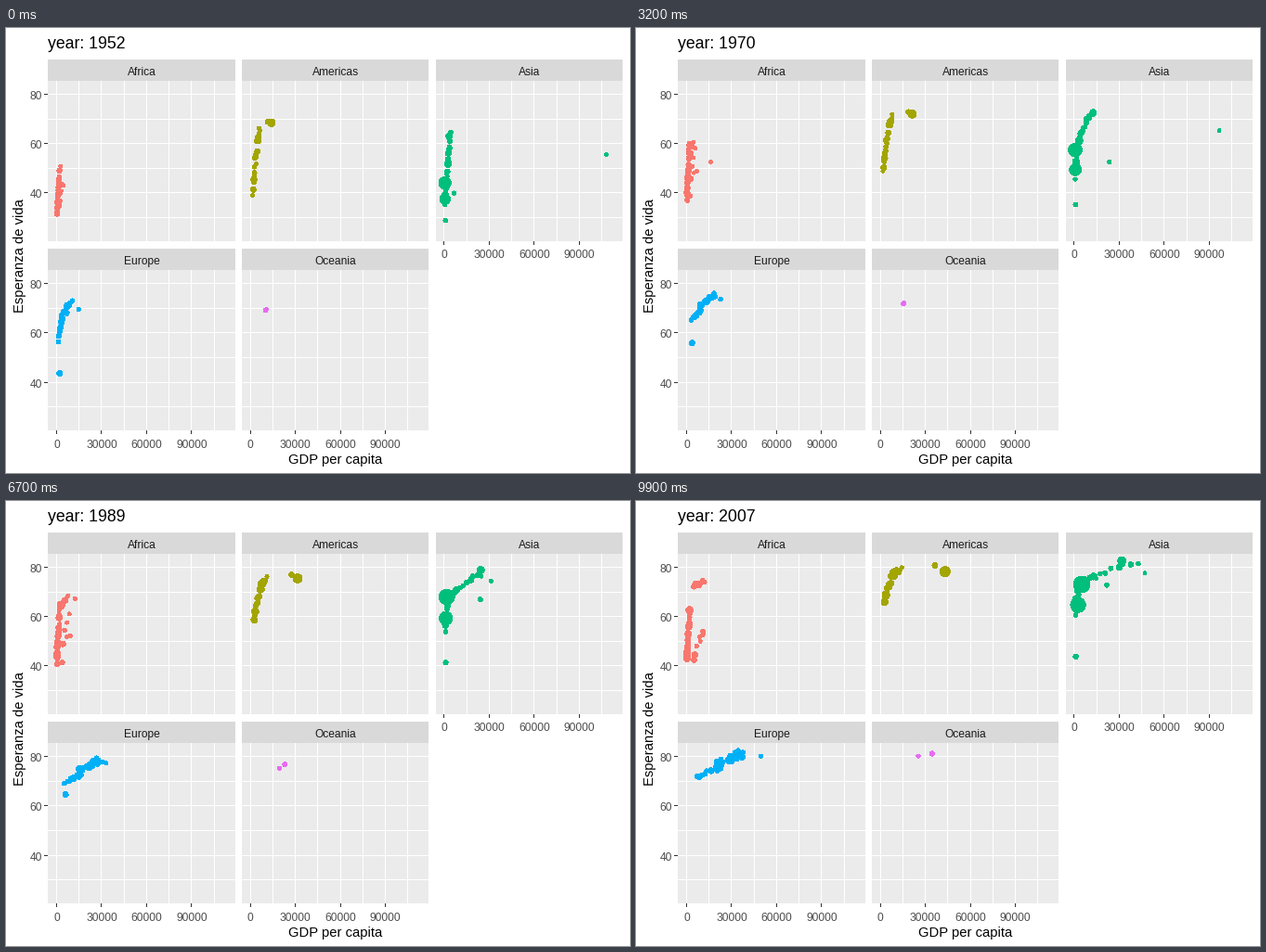
Animation, 672 px wide and 480 px high, one loop 10 s. Source, as a matplotlib script:

```python
import numpy as np
import matplotlib.pyplot as plt
from matplotlib.animation import FuncAnimation
from matplotlib.patches import Rectangle

W, H, DPI, FRAMES = 672, 480, 96, 100
PX = 72 / DPI
plt.rcParams["font.family"] = "Liberation Sans"

# Panel layout in pixels
LEFTS, TOPS = (45.7, 254.47, 463.23), (57, 261.2)
PANEL_W, PANEL_H, STRIP = 201.43, 173, 23
PANELS = {  # column, row, colour, yearly population growth
    "Africa": (0, 0, "#F8766D", 1.025),
    "Americas": (1, 0, "#A3A500", 1.017),
    "Asia": (2, 0, "#00BF7D", 1.017),
    "Europe": (0, 1, "#00B0F6", 1.005),
    "Oceania": (1, 1, "#E76BF3", 1.012),
}
TIME = np.linspace(0, 1, FRAMES)
YEARS = 1952 + 55 * TIME
rng = np.random.default_rng(7)


def px(gdp, col):
    """GDP in thousands to pixels."""
    return LEFTS[col] + (gdp + 5.423) * PANEL_W / 124.61


def py(life, row):
    return TOPS[row] + (85.44 - life) * 2.66


xs, ys, areas, colors = [], [], [], []


def add(panel, pop, gdp, life):
    """Add one country from its curves; pop is in millions as of 1977."""
    col, row, color, growth = PANELS[panel]
    people = np.clip(pop * growth ** (YEARS - 1977), 0.06, 1319)
    size = 1 + 5 * np.sqrt((people - 0.06) / 1319)
    radius = 1.4226 * size + 0.3
    xs.append(px(gdp, col))
    ys.append(py(life, row))
    areas.append((2 * radius * PX) ** 2)
    colors.append(color)


def track(panel, pop, gdp, life):
    """A country with evenly spaced key values over the whole period."""
    gdp, life = (np.interp(TIME, np.linspace(0, 1, len(k)), k) for k in (gdp, life))
    add(panel, pop, gdp, life)


def cloud(panel, n, biggest, shrink, gdp, life, boom=1.0, ease=(0.8, 0.8), bulge=0.0):
    """n countries; gdp and life each give (low, high, power) at the start and the end.

    A country's level u places it between low and high at both ends.
    """
    levels = rng.permutation((np.arange(n) + 0.5) / n)
    for rank, u in enumerate(levels):
        g0, g1 = ((a + (b - a) * u ** p) * rng.uniform(0.85, 1.15) for a, b, p in gdp)
        l0, l1 = (a + (b - a) * u ** p + rng.uniform(-1.5, 1.5) for a, b, p in life)
        pace = ease[0] + (ease[1] - ease[0]) * u
        rise = bulge * rng.random() * np.sin(np.pi * TIME)
        add(panel, biggest * shrink ** rank,
            g0 + (g1 - g0) * TIME ** boom,
            l0 + (l1 - l0) * TIME ** pace + rise)


# Africa: the low-income crowd, the north and islands, the richer south
cloud("Africa", 38, 60, 0.89, ((0.3, 1.6, 1.2), (0.3, 2.4, 1.5)),
      ((31, 47, 1), (43, 63, 1.2)), bulge=9)
cloud("Africa", 6, 39, 0.45, ((1.4, 2.7, 1), (4, 10, 1)), ((42, 52, 1), (71, 76, 1)), boom=1.3)
cloud("Africa", 7, 27, 0.5, ((1, 4.5, 1), (4, 13, 1)), ((33, 45, 1), (42, 56, 1)), bulge=18)
track("Africa", 2.7, (2.4, 7.5, 21.5, 14, 9.5, 12), (43, 48.5, 55, 65, 71, 74))

cloud("Americas", 23, 114, 0.8, ((1.5, 5.8, 1), (2, 13, 1.1)),
      ((39, 66, 0.85), (62, 79, 0.45)), boom=1.2, ease=(0.9, 0.8))
track("Americas", 220, (14, 25, 43), (68.4, 74, 78.2))
track("Americas", 24, (11.4, 22.5, 36.3), (68.8, 75, 80.7))

cloud("Asia", 27, 137, 0.84, ((0.6, 4.2, 1.3), (1, 46, 3.5)),
      ((36, 64, 1), (60, 82, 0.8)), boom=1.6)
track("Asia", 943, (0.4, 0.5, 0.7, 1.3, 2.2, 5), (44, 47.6, 63.5, 66.6, 70.1, 73))
track("Asia", 634, (0.5, 0.7, 0.8, 0.9, 1.4, 2.5), (37.4, 44.5, 52.5, 58, 61.5, 64.7))
track("Asia", 114, (3.2, 7, 16, 21.5, 28.5, 31.7), (63, 69.2, 74.5, 77.9, 80.4, 82.6))
track("Asia", 1.1, (108, 113, 95, 81, 109, 59, 31, 28, 35, 40, 35, 47), (55.6, 61, 68, 73.5, 76, 77.6))
track("Asia", 8, (6.5, 12.5, 30, 26, 21, 21.7), (39.9, 47, 56, 65, 70.2, 72.8))
track("Asia", 15, (0.8, 1), (28.8, 32.5, 37, 41, 41.8, 43.8))

cloud("Europe", 27, 78, 0.86, ((1.2, 10, 1.5), (6, 40, 0.75)),
      ((54, 73, 0.6), (72, 81.5, 0.7)), ease=(0.5, 1))
track("Europe", 42, (2, 4.5, 8.5), (43.6, 52.5, 58, 62.5, 68, 71.8))
track("Europe", 4, (10.1, 24, 49.4), (72.7, 75.7, 80.2))
track("Europe", 6, (14.7, 27, 37.5), (69.6, 75.8, 81.7))

track("Oceania", 14, (10, 12.7, 17.2, 20.9, 26.3, 34.4), (69.1, 70.9, 72.6, 75.7, 78.6, 81.2))
track("Oceania", 3.2, (10.6, 13.4, 16.2, 18.5, 20.6, 25.2), (69.4, 71.2, 72.1, 74.1, 77.3, 80.2))

xs, ys, areas = map(np.array, (xs, ys, areas))

fig = plt.figure(figsize=(W / DPI, H / DPI), dpi=DPI, facecolor="white")
ax = fig.add_axes((0, 0, 1, 1))
ax.set(xlim=(0, W), ylim=(H, 0))
ax.axis("off")


def box(x0, y0, x1, y1, color):
    """Fill whole pixels; equal edges give a one-pixel line."""
    x0, y0, x1, y1 = (int(np.floor(v)) for v in (x0, y0, x1, y1))
    ax.add_patch(Rectangle((x0, y0), max(x1 - x0, 1), max(y1 - y0, 1),
                           fc=color, lw=0, aa=False))


def label(x, y, text, size, color="black", ha="center", **kw):
    return ax.text(x, y, text, fontsize=size * PX, color=color, ha=ha, va="baseline", **kw)


for name, (col, row, *_) in PANELS.items():
    left, top = LEFTS[col], TOPS[row]
    right, bottom = left + PANEL_W, top + PANEL_H
    box(left, top - STRIP, right, top, "#D9D9D9")
    box(left, top, right, bottom, "#EBEBEB")
    label((left + right) / 2, top - 6, name, 12, "#1A1A1A")
    for gdp in range(0, 106, 15):
        x = px(gdp, col)
        box(x, top, x, bottom, "white")
        if gdp in (0, 30, 60, 90) and (row == 1 or col == 2):
            box(x, bottom, x, bottom + 4, "#333333")
            label(x, bottom + 18.4, str(gdp * 1000), 12, "#4D4D4D")
    for life in range(30, 81, 10):
        y = py(life, row)
        box(left, y, right, y, "white")
        if life in (40, 60, 80) and col == 0:
            box(left - 4, y, left, y, "#333333")
            label(left - 7, y + 5.6, str(life), 12, "#4D4D4D", "right")

label(354.8, 470, "GDP per capita", 14.7)
label(19, 245.7, "Esperanza de vida", 14.8, rotation=90, rotation_mode="anchor")
title = label(45, 22, "", 17.6, ha="left")
dots = ax.scatter(xs[:, 0], ys[:, 0], s=areas[:, 0], c=colors, lw=0, antialiased=False, zorder=3)


def update(i):
    title.set_text(f"year: {round(YEARS[i])}")
    dots.set_offsets(np.column_stack((xs[:, i], ys[:, i])))
    dots.set_sizes(areas[:, i])
    return title, dots


anim = FuncAnimation(fig, update, frames=FRAMES, interval=100, repeat=True, repeat_delay=0)
plt.show()
```
